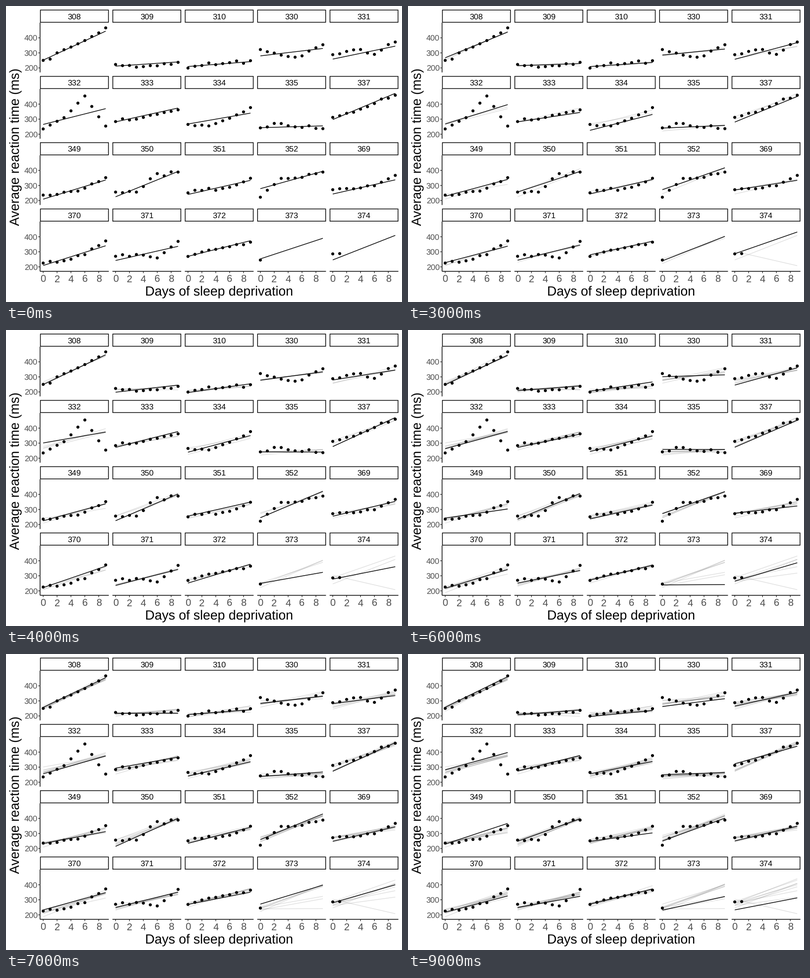
Recreate the animation shown at these times as a matplotlib script. Size 800 by 600 pixels, loop 10000 ms.

```python
import numpy as np
import matplotlib.pyplot as plt
from matplotlib.animation import FuncAnimation
from matplotlib.collections import LineCollection
from matplotlib.patches import Circle, Rectangle

plt.rcParams.update({
    "font.family": "Liberation Sans",
    "text.hinting": "none",
    "path.snap": False,
})

PT = 0.72                       # points per pixel at 100 dpi
LINE = 1.42 * PT
LEFT, TOP = 68.8, 7.5           # corner of the first strip
COL, ROW = 146.25, 134.4        # panel pitch
WIDTH, STRIP, HEIGHT = 138.9, 26.2, 127.07
TICK = 3.67
GREY = "#4d4d4d"

# Reaction times on days 0, 3, 6 and 9; the last two subjects stopped early
SUBJECTS = {
    308: (250, 321, 382, 466), 309: (223, 205, 214, 237),
    310: (199, 233, 235, 248), 330: (322, 285, 280, 354),
    331: (288, 320, 290, 372), 332: (235, 310, 454, 254),
    333: (284, 300, 332, 362), 334: (265, 255, 306, 377),
    335: (242, 271, 245, 237), 337: (312, 346, 404, 459),
    349: (236, 255, 282, 352), 350: (256, 256, 379, 389),
    351: (251, 281, 288, 348), 352: (222, 347, 354, 389),
    369: (272, 278, 298, 367), 370: (225, 240, 281, 372),
    371: (270, 282, 259, 369), 372: (269, 311, 334, 364),
    373: (245,), 374: (286, 288),
}

# Mixed model: population intercept and slope, their spread, residual spread
POP = np.array([251, 10.5])
POP_INV = np.diag([1 / 25**2, 1 / 6**2])
SIGMA = 25.6
DRAWS = 10

rng = np.random.default_rng(3)
fig = plt.figure(figsize=(8, 6), dpi=100, facecolor="white")
ax = fig.add_axes([0, 0, 1, 1])
ax.set(xlim=(0, 800), ylim=(600, 0))
ax.axis("off")


def px(day, col):
    return LEFT + COL * col + (day + 0.45) * WIDTH / 9.9


def py(ms, row):
    return 64.5 + ROW * row + (400 - ms) * 0.305


def text(x, y, s, size, color="black", **kw):
    ax.text(x, y, s, fontsize=size * PT, color=color,
            **{"ha": "center", "va": "baseline", **kw})


def stroke(x, y, color="black"):
    ax.plot(x, y, color=color, lw=LINE, solid_capstyle="butt", zorder=1)


def reaction_times(keys):
    """Join the key values and scatter the days between them."""
    if len(keys) < 4:
        return np.array(keys)
    days = np.arange(10)
    noise = rng.normal(0, 6, 10) * (days % 3 > 0)
    return np.interp(days, [0, 3, 6, 9], keys) + noise


def sample_fits(times):
    """Posterior draws of the subject's line, as values on days 0 and 9."""
    X = np.column_stack([np.ones(len(times)), np.arange(len(times))])
    cov = np.linalg.inv(X.T @ X / SIGMA**2 + POP_INV)
    mean = cov @ (X.T @ times / SIGMA**2 + POP_INV @ POP)
    a, b = rng.multivariate_normal(mean, cov, DRAWS).T
    return zip(a, a + 9 * b)


def panel(index, subject, keys):
    row, col = divmod(index, 5)
    x, y, half = LEFT + COL * col, TOP + ROW * row, 0.71
    ax.add_patch(Rectangle((x + half, y + half), WIDTH - 2 * half, STRIP - 2 * half,
                           fc="white", ec="black", lw=LINE))
    text(x + WIDTH / 2, y + 19, str(subject), 16.3)
    times = reaction_times(keys)
    for day, ms in enumerate(times):
        ax.add_patch(Circle((px(day, col), py(ms, row)), 3.08,
                            fc="black", lw=0, zorder=4))
    return [[(px(0, col), py(start, row)), (px(9, col), py(end, row))]
            for start, end in sample_fits(times)]


def axes():
    for row in range(4):
        y = TOP + ROW * row
        stroke([LEFT, LEFT], [y + STRIP, y + HEIGHT])
        for ms in (200, 300, 400):
            stroke([LEFT - TICK, LEFT], [py(ms, row)] * 2, "#333333")
            text(63.8, py(ms, row) + 5.8, str(ms), 16.3, GREY, ha="right")
    base = TOP + 3 * ROW + HEIGHT
    for col in range(5):
        x = LEFT + COL * col
        stroke([x, x + WIDTH], [base, base])
        for day in range(0, 9, 2):
            stroke([px(day, col)] * 2, [base, base + TICK], "#333333")
            text(px(day, col), 560, str(day), 20, GREY)
    text(430.7, 587, "Days of sleep deprivation", 26.67)
    text(26.9, 285.6, "Average reaction time (ms)", 26.67,
         rotation=90, rotation_mode="anchor")


axes()
fits = [panel(i, *item) for i, item in enumerate(SUBJECTS.items())]
old_lines = LineCollection([], colors="black", alpha=0.12, linewidths=LINE, zorder=2)
new_lines = LineCollection([], colors="black", linewidths=LINE, zorder=3)
for lines in (old_lines, new_lines):
    ax.add_collection(lines, autolim=False)


def draw(i):
    # the first draw holds for two seconds, the fifth is only seen as a trace
    k = i if i >= 5 else max(i - 1, 0)
    old_lines.set_segments([s for fit in fits for s in fit[:k]])
    new_lines.set_segments([fit[k] for fit in fits])
    return old_lines, new_lines


anim = FuncAnimation(fig, draw, frames=DRAWS, interval=1000, repeat=True)
plt.show()
```
